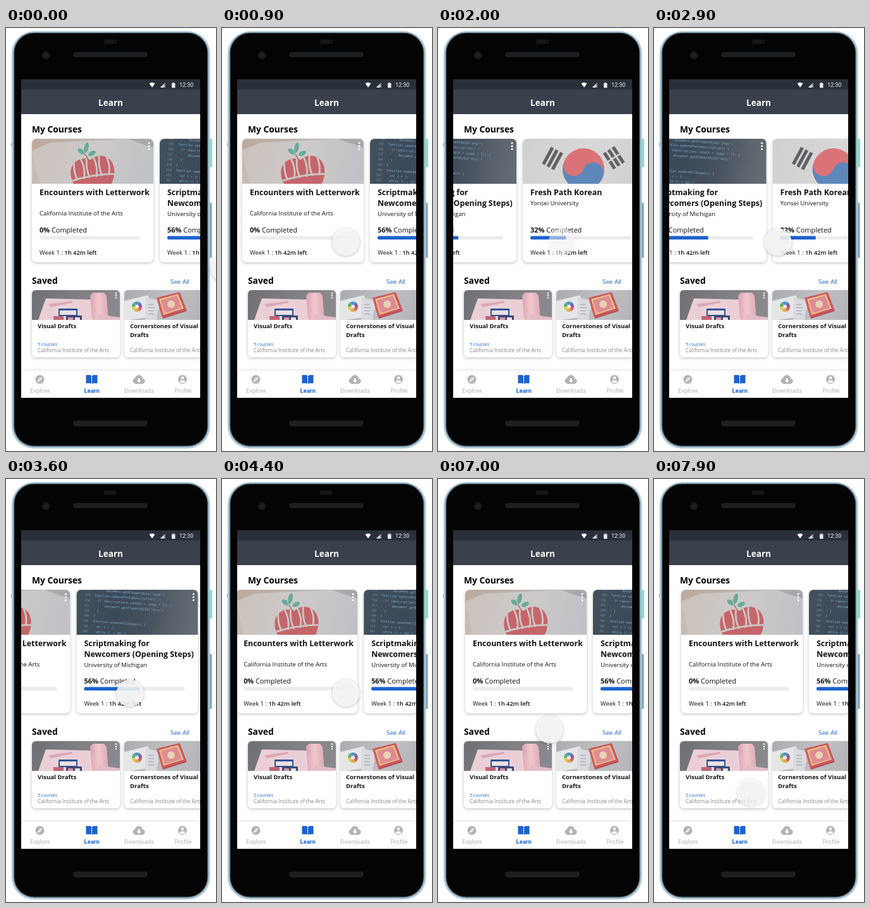
Write an HTML page with a canvas that moves like this. It is 332 px wide and 668 px high and loops after 8000 ms.

```html
<!DOCTYPE html>
<html lang="en">
<head>
<meta charset="utf-8">
<title>Course app</title>
<style>
html, body { margin: 0; width: 100%; height: 100%; overflow: hidden; background: #fff; }
canvas { display: block; width: 332px; height: 668px; }
</style>
</head>
<body>
<canvas id="stage"></canvas>
<script>
const W = 332, H = 668, LOOP = 8000;
const BLUE = '#1d62cf', INK = '#111';
const SANS = '"Open Sans", "Noto Sans", sans-serif';
const MONO = '"DejaVu Sans Mono", monospace';
const ROBOTO = 'Roboto, sans-serif';
const canvas = document.getElementById('stage');
const ctx = canvas.getContext('2d');
const dpr = window.devicePixelRatio || 1;
canvas.width = W * dpr;
canvas.height = H * dpr;

const ease = u => u < 0.5 ? 2 * u * u : 1 - 2 * (1 - u) * (1 - u);

// Eased value at time t between [time, value] points
function key(t, pts) {
  if (t <= pts[0][0]) return pts[0][1];
  for (let i = 1; i < pts.length; i++) {
    const [a, va] = pts[i - 1], [b, vb] = pts[i];
    if (t <= b) return va + (vb - va) * ease((t - a) / (b - a));
  }
  return pts[pts.length - 1][1];
}

function text(s, x, y, size, color = INK, weight = 400, align = 'left', font = SANS) {
  ctx.font = `${weight} ${size}px ${font}`;
  ctx.fillStyle = color;
  ctx.textAlign = align;
  ctx.fillText(s, x, y);
  return x + ctx.measureText(s).width;
}

function box(x, y, w, h, r, color) {
  ctx.beginPath();
  ctx.roundRect(x, y, w, h, r);
  ctx.fillStyle = color;
  ctx.fill();
}

function disc(x, y, r, color) {
  ctx.beginPath();
  ctx.arc(x, y, r, 0, Math.PI * 2);
  ctx.fillStyle = color;
  ctx.fill();
}

function poly(color, ...p) {
  ctx.beginPath();
  for (let i = 0; i < p.length; i += 2) ctx.lineTo(p[i], p[i + 1]);
  ctx.closePath();
  ctx.fillStyle = color;
  ctx.fill();
}

function fade(x0, y0, x1, y1, ...colors) {
  const g = ctx.createLinearGradient(x0, y0, x1, y1);
  colors.forEach((c, i) => g.addColorStop(i / (colors.length - 1), c));
  return g;
}

function at(x, y, angle, draw) {
  ctx.save();
  ctx.translate(x, y);
  ctx.rotate(angle);
  draw();
  ctx.restore();
}

function shadowed(color, blur, dy, draw) {
  ctx.save();
  ctx.shadowColor = color;
  ctx.shadowBlur = blur * dpr;
  ctx.shadowOffsetY = dy * dpr;
  draw();
  ctx.restore();
}

function dots(x, y, gap, r) {
  for (let i = 0; i < 3; i++) disc(x, y + i * gap, r, '#fff');
}

// Card with a picture on top; origin moves to its corner
function card(x, y, w, h, imgH, r, picture, draw) {
  ctx.save();
  ctx.translate(x, y);
  shadowed('rgba(0,0,0,.24)', 5, 1.5, () => box(0, 0, w, h, r, '#fff'));
  ctx.save();
  ctx.beginPath();
  ctx.roundRect(0, 0, w, imgH, [r, r, 0, 0]);
  ctx.clip();
  picture();
  ctx.restore();
  draw();
  ctx.restore();
}

function applePicture() {
  box(0, 0, 192, 71, 0, fade(0, 0, 192, 40, '#bdaa9c', '#b9b3b0', '#a3a5aa'));
  poly(fade(0, 10, 192, 60, '#cbc2bc', '#cdcac9', '#bfc1c5'), 0, 18, 30, 6, 150, 0, 192, 14, 192, 71, 0, 71);
  poly('#c6bcb5', 0, 18, 12, 71, 0, 71);
  at(95, 50, -0.16, () => {
    ctx.save();
    ctx.beginPath();
    ctx.moveTo(0, -17);
    ctx.bezierCurveTo(14, -27, 36, -18, 35, 3);
    ctx.bezierCurveTo(34, 20, 24, 34, 8, 36);
    ctx.lineTo(-10, 36);
    ctx.bezierCurveTo(-27, 30, -36, 16, -34, 0);
    ctx.bezierCurveTo(-33, -18, -14, -26, 0, -17);
    ctx.fillStyle = '#c4656a';
    ctx.fill();
    ctx.clip();
    ctx.strokeStyle = '#cdc7c5';
    ctx.lineWidth = 2.8;
    for (let i = 0; i < 6; i++) {
      const x = -25 + i * 10;
      ctx.beginPath();
      ctx.moveTo(x, -22);
      ctx.quadraticCurveTo(x + (i % 2 ? 6 : -5), -3, x, 11);
      ctx.stroke();
    }
    ctx.beginPath();
    ctx.moveTo(-40, 12);
    ctx.quadraticCurveTo(0, 5, 40, 12);
    ctx.stroke();
    ctx.restore();
  });
  const leaf = (x, y, a, r) => at(x, y, a, () => {
    ctx.beginPath();
    ctx.ellipse(0, 0, r, 4, 0, 0, 7);
    ctx.fillStyle = '#6ba99b';
    ctx.fill();
    ctx.strokeStyle = '#d0d6d0';
    ctx.lineWidth = 0.7;
    ctx.stroke();
  });
  leaf(78, 20, 0.65, 7);
  leaf(86, 14, 1.8, 9);
  leaf(95, 23, -0.5, 7);
  ctx.strokeStyle = '#a46659';
  ctx.lineWidth = 1.5;
  ctx.beginPath();
  ctx.moveTo(84, 24);
  ctx.lineTo(89, 33);
  ctx.stroke();
}

const CODE = [
  '      document.getElementById("page")',
  'function updatePhotoDescription() {',
  '  if (descriptions.length > (page * 5)) {',
  '      document.getElementById("desc")',
  '  }',
  '}',
  'function updateAllImages() {',
  '  var i = 1;',
  '  while (i < 10) {',
  '    var elementId = "photo" + i;'
];

function codePicture() {
  box(0, 0, 192, 71, 0, fade(0, 0, 192, 50, '#43515f', '#3b4958', '#47525e', '#697078'));
  at(14, 1, 0.07, () => {
    CODE.forEach((line, i) => {
      const y = i * 8.2;
      text(154 + i, 0, y, 4.6, '#8796a3', 400, 'left', MONO);
      const x = 15 + line.search(/\S/) * 2.9;
      text(line.trim(), x, y, 5, i % 3 === 1 ? '#74b0e2' : '#86aecf', 400, 'left', MONO);
    });
  });
  box(0, 0, 192, 71, 0, fade(100, 0, 192, 0, 'rgba(96,104,113,0)', 'rgba(96,104,113,.6)'));
}

function trigram(x, y, angle, split) {
  at(x, y, angle, () => {
    for (let i = -1; i <= 1; i++) {
      box(i * 8.3 - 2.6, -15, 5.2, 30, 0, '#606164');
      if (split && i) box(i * 8.3 - 3, -1.3, 6, 2.6, 0, '#d0d0d1');
    }
    if (split) box(-3, -1.3, 6, 2.6, 0, '#d0d0d1');
  });
}

function flagPicture() {
  box(0, 0, 192, 71, 0, fade(0, 0, 192, 71, '#cfd0d1', '#d9d7d7', '#d1d0d1'));
  trigram(47, 31, 0.5, false);
  trigram(144, 30, -0.58, true);
  at(96, 48, 0.36, () => {
    const r = 33;
    disc(0, 0, r, '#d97378');
    ctx.beginPath();
    ctx.arc(0, 0, r, 0, Math.PI);
    ctx.arc(-r / 2, 0, r / 2, Math.PI, 0, true);
    ctx.arc(r / 2, 0, r / 2, Math.PI, 0);
    ctx.fillStyle = '#5d87bb';
    ctx.fill();
  });
}

function posterPicture() {
  box(0, 0, 139, 47, 0, fade(0, 0, 139, 47, '#6f7075', '#7f7f84', '#8c8b90'));
  poly('#ead0d6', 22, 13, 97, 15, 108, 47, 10, 47);
  poly('#dba9b6', 26, 22, 64, 17, 64, 20, 30, 27);
  box(42, 29, 30, 12, 1, '#2d5398');
  box(44, 32, 26, 7, 0, '#ece0e5');
  box(34, 41, 16, 7, 0, '#c06472');
  box(54, 40, 25, 8, 1, '#3f4a72');
  box(57, 43, 8, 5, 0, '#d798a4');
  box(68, 43, 8, 5, 0, '#ecdce0');
  poly(fade(92, 0, 119, 0, '#dda5b1', '#f0c6ce', '#e2aeb9'), 92, 8, 97, 4, 114, 4, 118, 9, 121, 47, 95, 47);
  poly('#e3bcc5', 105, 38, 139, 43, 139, 47, 103, 47);
}

function printPicture() {
  box(0, 0, 139, 47, 0, fade(0, 0, 139, 47, '#aaabb0', '#c0c0c4', '#b0b0b5'));
  poly('#e6e6e8', 0, 17, 37, 8, 52, 41, 8, 47, 0, 47);
  poly('#d9dade', 34, 11, 56, 17, 51, 47, 33, 47);
  const hues = ['#d85a64', '#e0a94d', '#d9d14f', '#5fb078', '#4c94c7', '#7b62ab'];
  hues.forEach((c, i) => {
    ctx.beginPath();
    ctx.moveTo(20, 26);
    ctx.arc(20, 26, 8, i * Math.PI / 3, (i + 1) * Math.PI / 3);
    ctx.fillStyle = c;
    ctx.fill();
  });
  disc(20, 26, 3, '#e8e8ea');
  for (let i = 0; i < 4; i++) box(38, 22 + i * 5, 9, 1, 0, '#9aa1ad');
  poly('#b0525a', 52, 14, 88, 4, 99, 33, 61, 45);
  poly('#d2555f', 51, 12, 87, 3, 98, 31, 60, 43);
  poly('#e6be83', 55, 14, 85, 6, 94, 29, 62, 39);
  poly('#de8b93', 58, 16, 83, 9, 91, 28, 64, 36);
  disc(74, 22, 6, '#ead0b4');
}

const COURSES = [
  { title: ['Encounters with Letterwork'], school: 'California Institute of the Arts', sy: 121, done: 0, bar: 0, picture: applePicture },
  { title: ['Scriptmaking for', 'Newcomers (Opening Steps)'], school: 'University of Michigan', sy: 122, done: 56, bar: 88, picture: codePicture },
  { title: ['Fresh Path Korean'], school: 'Yonsei University', sy: 105, done: 32, bar: 56, picture: flagPicture }
];

function courseCard(c, x) {
  card(x, 175, 192, 195, 71, 7, c.picture, () => {
    dots(185, 6.8, 4.7, 1.5);
    c.title.forEach((s, i) => text(s, 12, 89 + i * 17, 12.4, INK, 700));
    text(c.school, 12, c.sy, 9.63);
    const nx = text(c.done + '%', 12, 148, 10.95, INK, 700);
    text(' Completed', nx, 148, 10.95);
    box(12, 153.5, 159, 5.5, 2, '#ececec');
    if (c.bar) box(12, 153.5, c.bar, 5.5, [2, 0, 0, 2], BLUE);
    const wx = text('Week 1 : ', 12, 183, 9.43);
    text('1h 42m left', wx, 183, 9.43, INK, 600);
  });
}

function savedCards() {
  const school = 'California Institute of the Arts';
  card(41, 414, 139, 106, 47, 6, posterPicture, () => {
    dots(133, 4.5, 3.7, 1.2);
    text('Visual Drafts', 9, 60, 9.6, INK, 700);
    text('5 courses', 9, 88, 7, BLUE);
    text(school, 9, 98, 8.25, '#858585');
  });
  card(187, 414, 139, 106, 47, 6, printPicture, () => {
    text('Cornerstones of Visual', 9, 60, 9.6, INK, 700);
    text('Drafts', 9, 74, 9.6, INK, 700);
    text(school, 9, 98, 8.25, '#858585');
  });
}

function phone() {
  box(321, 175, 5, 45, 1.5, '#83e3c8');
  box(321, 276, 4.5, 87, 1.5, '#86a2b4');
  box(8, 181, 3, 6, 1, '#8ea8b8');
  // Metal rim darkening towards the glass
  ['#a5c3d3', '#b9d3e1', '#8aa5b5', '#485965', '#040405'].forEach((c, i) => {
    const dx = i * 1.1, dy = i * 0.8;
    box(9 + dx, 5 + dy, 313.5 - 2 * dx, 659 - 2.4 * dy, 35 - dx, c);
  });
  box(155, 18, 20, 7, 3, '#141517');
  disc(63, 43, 6.5, '#17181a');
  disc(63, 43, 3, '#222328');
  box(106, 38, 118, 8, 4, '#1d1e20');
  box(106, 620, 118, 9, 4, '#1d1e20');
}

function statusBar() {
  box(24, 81, 283, 16, 0, '#2a303a');
  box(24, 97, 283, 39, 0, '#3a414c');
  text('Learn', 165.5, 123, 13.5, '#fff', 700, 'center');
  text('12:30', 274, 93, 9, '#eee', 400, 'left', ROBOTO);
  ctx.beginPath();
  ctx.moveTo(231, 94);
  ctx.lineTo(226.5, 87.5);
  ctx.quadraticCurveTo(231, 84.5, 235.5, 87.5);
  ctx.fillStyle = '#fff';
  ctx.fill();
  poly('#8a9097', 244, 94, 252, 94, 252, 86);
  poly('#eee', 244, 94, 249.5, 94, 249.5, 88.5);
  box(262, 87, 5.5, 7.5, 0.8, '#eee');
  box(263.5, 85.5, 2.5, 2, 0, '#9a9fa5');
}

function navBar() {
  const grey = '#b3b3b3';
  shadowed('rgba(0,0,0,.2)', 4, -0.5, () => box(24, 541, 283, 43, 0, '#fff'));
  const label = (s, x, c, w) => text(s, x, 576, 9.5, c, w, 'center', ROBOTO);
  label('Explore', 54, grey, 400);
  label('Learn', 135.7, BLUE, 700);
  label('Downloads', 210.5, grey, 400);
  label('Profile', 280, grey, 400);

  disc(53.5, 555, 7, grey);
  poly('#fff', 57.5, 551, 55, 556.5, 49.5, 559, 52, 553.5);
  disc(53.5, 555, 1, grey);

  poly(BLUE, 126.5, 548, 133, 548, 135, 549.2, 135, 562, 133, 561, 126.5, 561);
  poly(BLUE, 136, 549.2, 138, 548, 144.5, 548, 144.5, 561, 138, 561, 136, 562);

  disc(205.5, 557.2, 4.8, grey);
  disc(210, 554, 6, grey);
  disc(215.5, 557.6, 4.2, grey);
  box(205, 556, 11, 6, 1, grey);
  box(209, 553, 2.4, 4, 0, '#fff');
  poly('#fff', 206.6, 556.6, 213.8, 556.6, 210.2, 560.4);

  disc(279, 555, 7, grey);
  disc(279, 552.6, 2.3, '#fff');
  ctx.beginPath();
  ctx.ellipse(279, 558.4, 4.2, 2.2, 0, 0, 7);
  ctx.fill();
}

function touch(t) {
  const x = key(t, [[0, 346], [700, 196], [4850, 196], [5550, 226], [6400, 226], [7400, 153]]);
  const y = key(t, [[0, 381], [700, 338], [4850, 338], [5550, 184], [6400, 184], [7400, 495]]);
  const a = key(t, [[1700, 1], [2000, 0.62], [2350, 1], [5700, 1], [6100, 0.35], [6450, 1], [7600, 1], [7900, 0.88]]);
  ctx.globalAlpha = 0.85 * a;
  shadowed(`rgba(0,0,0,${0.3 * a * a})`, 5, 1, () => disc(x, y, 21.5, '#fcfcfc'));
  ctx.globalAlpha = 1;
}

function draw(t) {
  ctx.setTransform(dpr, 0, 0, dpr, 0, 0);
  box(0, 0, W, H, 0, '#fff');
  phone();
  ctx.save();
  ctx.beginPath();
  ctx.rect(24, 81, 283, 503);
  ctx.clip();
  box(24, 81, 283, 503, 0, '#fff');
  statusBar();
  text('My Courses', 41, 165, 13.8, '#000', 700);
  text('Saved', 41, 404, 13.8, '#000', 700);
  text('See All', 260, 404, 9.8, BLUE);
  const scroll = key(t, [[743, 0], [2055, 312], [4924, -2]]);
  COURSES.forEach((c, i) => courseCard(c, 41 + i * 202 - scroll));
  savedCards();
  navBar();
  ctx.restore();
  touch(t);
}

const start = performance.now();
function tick() {
  draw((performance.now() - start) % LOOP);
  requestAnimationFrame(tick);
}
tick();
</script>
</body>
</html>
```
